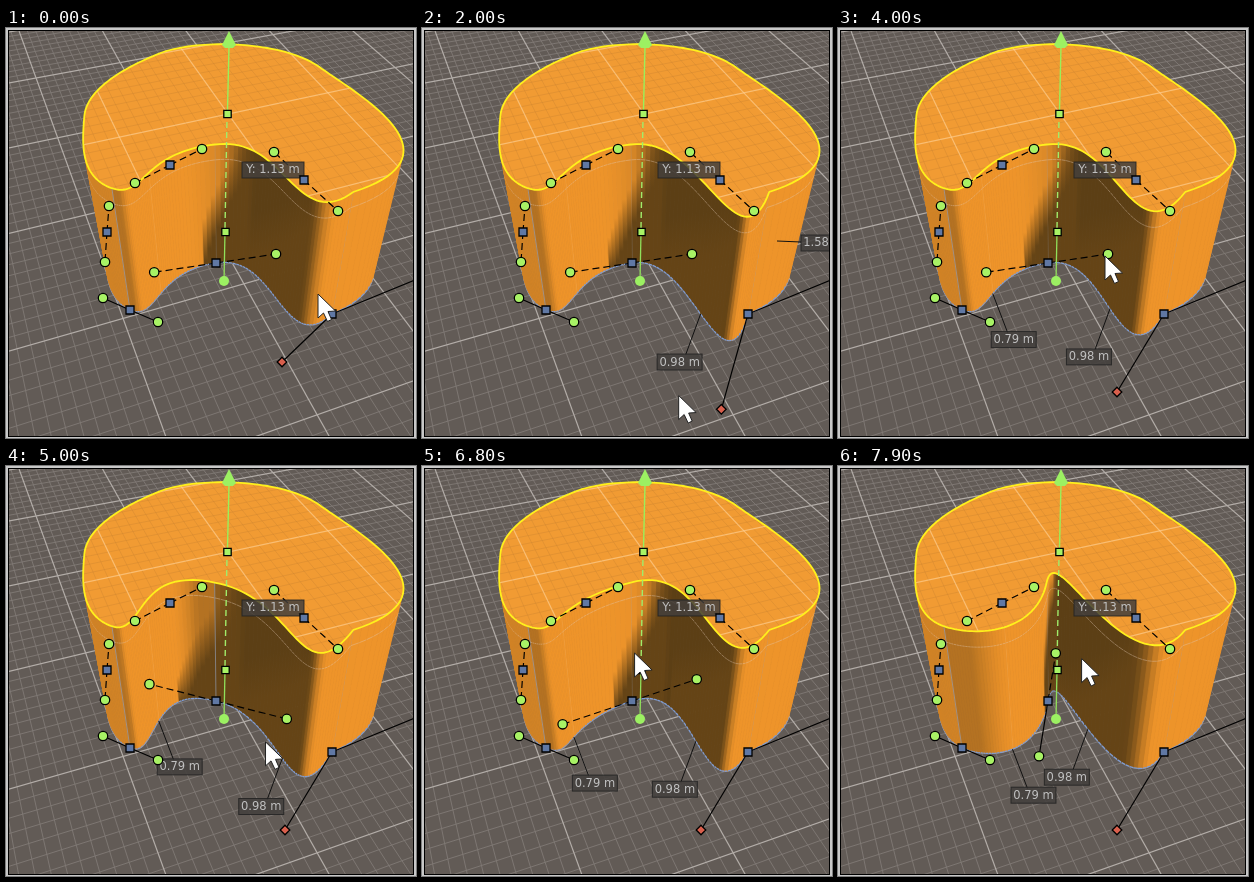
These frames come from a looping animation (410 px wide and 410 px high, 8000 ms). An HTML page with a canvas:

```html
<!DOCTYPE html>
<html lang="en">
<head>
<meta charset="utf-8">
<title>Spline extrusion</title>
<style>
html, body { margin: 0; width: 100%; height: 100%; overflow: hidden; background: #c8c8c8; }
canvas { display: block; }
</style>
</head>
<body>
<canvas id="stage" width="410" height="410"></canvas>
<script>
const ctx = document.getElementById('stage').getContext('2d');
const LOOP = 8000, STEPS = 40;
const VIEW = [2.5, 2.5, 405, 406];
const HORIZON = -420, VANISH_Q = -140, VANISH_P = 2600;
const LIGHT = [0.87, 0.5];
const LIME = '#a8f265', YELLOW = '#fff01c';

// Fixed spline nodes on the floor: position, incoming handle, outgoing handle.
const A = { at: [124, 282], in: [97, 270], out: [152, 294] };
const E = { at: [298, 152], in: [332, 183], out: [268, 124] };
const F = { at: [164, 137], in: [196, 121], out: [129, 155] };
const G = { at: [101, 204], in: [103, 178], out: [99, 234] };
const B_AT = [210, 235], C_AT = [326, 286], C_OUT = [421, 247];

// Timing of the two drags; the handle trails the pointer by LAG.
const DRAG_RED = 900, RED_TIME = 1800, LEAVE_RED = 3100, DRAG_TURN = 4200, LAG = 200;
// Swing of the middle handle: time, degrees.
const SWING = [
  [4300, -14], [5000, 17], [5600, 110], [6000, 92], [6200, 77],
  [6800, -29], [7000, -88], [7400, -98], [7900, -84], [8100, -63]
];

const clamp = v => Math.min(1, Math.max(0, v));
const smooth = (a, b, v) => { const u = clamp((v - a) / (b - a)); return u * u * (3 - 2 * u); };
const lerp = (p, q, u) => [p[0] + (q[0] - p[0]) * u, p[1] + (q[1] - p[1]) * u];
const raise = ([x, y]) => [217 + (x - 217) * 1.195, 17 + (y - 128) * 0.93];

function swingAngle(t) {
  const i = SWING.findIndex(k => k[0] > t);
  if (i <= 0) return SWING[i ? SWING.length - 1 : 0][1];
  const [t0, a0] = SWING[i - 1], [t1, a1] = SWING[i];
  return a0 + (a1 - a0) * (t - t0) / (t1 - t0);
}

// The middle handle rides an ellipse around its node.
function turnHandle(t) {
  const a = swingAngle(t) * Math.PI / 180;
  const reach = 62 + 12 * smooth(4300, 5000, t);
  return [B_AT[0] + reach * Math.cos(a), B_AT[1] + 3 + 51 * Math.sin(a)];
}

// The red handle sways sideways and dips, then settles.
function redHandle(t) {
  const s = clamp((t - DRAG_RED) / RED_TIME);
  return [
    276 + 3 * s - 43 * Math.sin(3 * Math.PI * s),
    364 - 30 * Math.cos(2 * Math.PI * s) * (1 - s) ** 0.3
  ];
}

function pointer(t) {
  if (t < DRAG_RED - LAG) {
    const s = t / (DRAG_RED - LAG);
    const [x, y] = lerp([312, 266], redHandle(0), smooth(0, 1, s));
    return [x, y + 60 * Math.sin(Math.PI * s)];
  }
  if (t < LEAVE_RED) return redHandle(t + LAG);
  if (t < DRAG_TURN) return lerp(redHandle(t), [267, 228], smooth(LEAVE_RED, 4000, t));
  return turnHandle(t + LAG);
}

// Cubic curve on the floor, weighted by depth for perspective.
function bezier(n, m, t) {
  const s = 1 - t, k = [s * s * s, 3 * s * s * t, 3 * s * t * t, t * t * t];
  let x = 0, y = 0, sum = 0;
  [n.at, n.out, m.in, m.at].forEach((p, i) => {
    const w = k[i] / (p[1] - HORIZON);
    x += w * p[0]; y += w * p[1]; sum += w;
  });
  return [x / sum, y / sum];
}

function path(points, close) {
  ctx.beginPath();
  points.forEach(p => ctx.lineTo(p[0], p[1]));
  if (close) ctx.closePath();
}

function line(points, color, width = 1, dash = []) {
  path(points);
  ctx.setLineDash(dash);
  ctx.strokeStyle = color;
  ctx.lineWidth = width;
  ctx.stroke();
  ctx.setLineDash([]);
}

// Two pencils of lines, each evenly spaced along the row y = 340.
function grid(q0, p0, scale, minor, major) {
  const ray = (vx, x, color, width) => {
    const v = [vx, HORIZON];
    line([v, lerp(v, [x, 340], 1.5)], color, width);
  };
  for (const strong of [false, true]) {
    const color = strong ? major : minor, width = strong ? 1.2 : 0.9;
    for (let k = -60; k <= 60; k++) {
      if ((k % 10 === 0) !== strong) continue;
      ray(VANISH_Q, q0 + k * 15 * scale, color, width);
      ray(VANISH_P, p0 + k * 50 * scale, color, width);
    }
  }
}

// Distance along the light direction from p to edge ab, or Infinity.
function hit(p, a, b) {
  const ex = b[0] - a[0], ey = b[1] - a[1];
  const det = LIGHT[1] * ex - LIGHT[0] * ey;
  if (Math.abs(det) < 1e-6) return Infinity;
  const ax = a[0] - p[0], ay = a[1] - p[1];
  const d = (ay * ex - ax * ey) / det;
  const u = (LIGHT[0] * ay - LIGHT[1] * ax) / det;
  return d > 2 && u >= 0 && u <= 1 ? d : Infinity;
}

function orange(b) {
  const dark = [92, 63, 21], lit = [238, 148, 42];
  return `rgb(${dark.map((c, i) => Math.round(c + (lit[i] - c) * b))})`;
}

// Wall colour: facing the light, with the right lobe's shadow rising from the floor.
function wallFill(points, { p, pt, dx, dy, segment }) {
  const facing = (-dy * LIGHT[0] + dx * LIGHT[1]) / (Math.hypot(dx, dy) || 1);
  const floor = segment === 0 ? 0.6 : segment === 1 ? 0 : 0.8;
  const bright = Math.max(floor, smooth(-0.15, 0.85, facing));
  if (segment > 1) return orange(bright);
  let d = Infinity;
  for (let j = STEPS; j < 2 * STEPS; j++) d = Math.min(d, hit(p, points[j], points[j + 1]));
  const height = 1 - d / 130;
  if (height <= 0) return orange(bright);
  const fill = ctx.createLinearGradient(...p, ...pt);
  fill.addColorStop(clamp(height - 0.18), orange(0.06));
  fill.addColorStop(clamp(height + 0.18), orange(bright));
  return fill;
}

function drawWalls(points) {
  const strips = [];
  points.forEach((p, i) => {
    const q = points[(i + 1) % points.length], pt = raise(p), qt = raise(q);
    const dx = q[0] - p[0], dy = q[1] - p[1];
    if (dx * (pt[1] - p[1]) - dy * (pt[0] - p[0]) >= 0) return;
    strips.push({ i, p, q, pt, qt, dx, dy, segment: Math.floor(i / STEPS) });
  });
  strips.sort((a, b) => a.p[1] + a.q[1] - b.p[1] - b.q[1]);
  for (const strip of strips) {
    const { i, p, q, pt, qt, segment } = strip;
    path([p, q, qt, pt], true);
    ctx.fillStyle = ctx.strokeStyle = wallFill(points, strip);
    ctx.lineWidth = 0.8;
    ctx.fill();
    ctx.stroke();
    line([lerp(p, pt, 0.87), lerp(q, qt, 0.87)], 'rgba(225,200,180,.4)');
    if (i === STEPS / 2) line([p, pt], 'rgba(255,215,165,.45)');
    if (i <= 2 * STEPS && i % STEPS === 0) line([p, pt], 'rgba(150,165,195,.6)');
    if (segment < 3 || segment === 5) line([p, q], '#7f9cd2', 1.3);
  }
}

function drawTop(points) {
  const top = points.map(raise);
  path(top, true);
  ctx.fillStyle = '#f19b33';
  ctx.fill();
  ctx.save();
  ctx.clip();
  grid(404, -971, 1.2, 'rgba(200,130,50,.4)', 'rgba(255,210,150,.65)');
  ctx.restore();
  path(top, true);
  ctx.strokeStyle = YELLOW;
  ctx.lineWidth = 1.8;
  ctx.stroke();
}

function marker([x, y], shape, fill, r) {
  ctx.beginPath();
  if (shape === 'circle') ctx.arc(x, y, r, 0, 7);
  else if (shape === 'square') ctx.rect(x - r, y - r, 2 * r, 2 * r);
  else [[0, -r], [r, 0], [0, r], [-r, 0]].forEach(d => ctx.lineTo(x + d[0], y + d[1]));
  ctx.closePath();
  ctx.fillStyle = fill;
  ctx.fill();
  ctx.strokeStyle = '#000';
  ctx.lineWidth = 1.3;
  ctx.stroke();
}

function label(text, x, y, width) {
  ctx.fillStyle = 'rgba(66,63,60,.85)';
  ctx.fillRect(x - width / 2, y - 8, width, 16);
  ctx.strokeStyle = 'rgba(35,35,35,.85)';
  ctx.lineWidth = 1;
  ctx.strokeRect(x - width / 2, y - 8, width, 16);
  ctx.fillStyle = '#c0c0c0';
  ctx.font = '11.5px "DejaVu Sans", sans-serif';
  ctx.textAlign = 'center';
  ctx.textBaseline = 'middle';
  ctx.fillText(text, x, y + 0.5);
}

function measure(text, [x, y], dx, dy) {
  line([[x, y], [x + dx * 0.72, y + dy * 0.86]], '#111');
  label(text, x + dx, y + dy, 45);
}

function drawGizmo() {
  line([[218, 253], [219, 204]], '#90e05a', 1.3);
  line([[219, 200], [221, 90]], '#a0ec6a', 1.4, [6, 4]);
  line([[221.5, 82], [223, 18]], '#9af05a', 1.4);
  path([[223, 3], [216, 17], [219, 20], [227, 20], [230, 17]], true);
  ctx.fillStyle = '#9cf062';
  ctx.fill();
  ctx.beginPath();
  ctx.arc(218, 253, 5, 0, 7);
  ctx.fill();
}

function drawPointer([x, y]) {
  const outline = [[0, 0], [0, 24], [5.5, 19], [9.5, 27.5], [13.5, 25.5], [10, 17.5], [17.5, 17]];
  path(outline.map(p => [x + p[0], y + p[1]]), true);
  ctx.fillStyle = '#fff';
  ctx.fill();
  ctx.strokeStyle = '#222';
  ctx.lineWidth = 1;
  ctx.stroke();
}

function draw(t) {
  const red = redHandle(t), right = t < DRAG_TURN + 100 ? [270, 226] : turnHandle(t);
  // The opposite handle mirrors this one, foreshortened by depth.
  const left = lerp(B_AT, right, (right[1] - B_AT[1]) * 0.0033 - 1);
  const B = { at: B_AT, in: left, out: right };
  const C = { at: C_AT, in: red, out: C_OUT };
  const nodes = [A, B, C, E, F, G];
  const points = nodes.flatMap((n, i) =>
    Array.from({ length: STEPS }, (_, k) => bezier(n, nodes[(i + 1) % 6], k / STEPS)));

  ctx.fillStyle = '#c8c8c8';
  ctx.fillRect(0, 0, 410, 410);
  ctx.save();
  ctx.beginPath();
  ctx.rect(...VIEW);
  ctx.clip();
  ctx.fillStyle = '#625b56';
  ctx.fillRect(0, 0, 410, 410);
  grid(285, -556, 1, '#817a75', '#b3ada8');

  drawWalls(points);
  drawTop(points);
  drawGizmo();

  for (const n of nodes) {
    for (const h of [n.in, n.out]) {
      const open = n === A || n === C || h[1] > 270;
      line([n.at, h], '#000', 1.2, open ? [] : [7, 4]);
    }
  }
  const onRed = t >= 600 && t < 3500, onTurn = t >= 3900;
  if (onRed || onTurn) measure('0.98 m', bezier(B, C, 0.5), -21, 48);
  if (onTurn) measure('0.79 m', bezier(A, B, 0.5), 21, 46);
  if (onRed) {
    line([[355, 213], [379, 214]], '#111');
    label('1.58 m', 401.5, 215, 45);
  }
  label('Y: 1.13 m', 267, 142, 62);

  for (const n of nodes) {
    marker(n.at, 'square', '#6078a4', 4);
    for (const h of [n.in, n.out]) {
      if (h === red) marker(h, 'diamond', onRed && t > 2600 ? '#e8402c' : '#d85f4c', 4.8);
      else if (h !== C_OUT) marker(h, 'circle', LIME, 4.7);
    }
  }
  marker([221.5, 86], 'square', LIME, 3.7);
  marker([219.5, 204], 'square', LIME, 3.7);
  drawPointer(pointer(t));
  ctx.restore();
  ctx.strokeStyle = '#000';
  ctx.lineWidth = 1;
  ctx.strokeRect(...VIEW);
}

function tick() {
  draw(Math.floor(performance.now() % LOOP / 100) * 100);
  requestAnimationFrame(tick);
}
tick();
</script>
</body>
</html>
```
